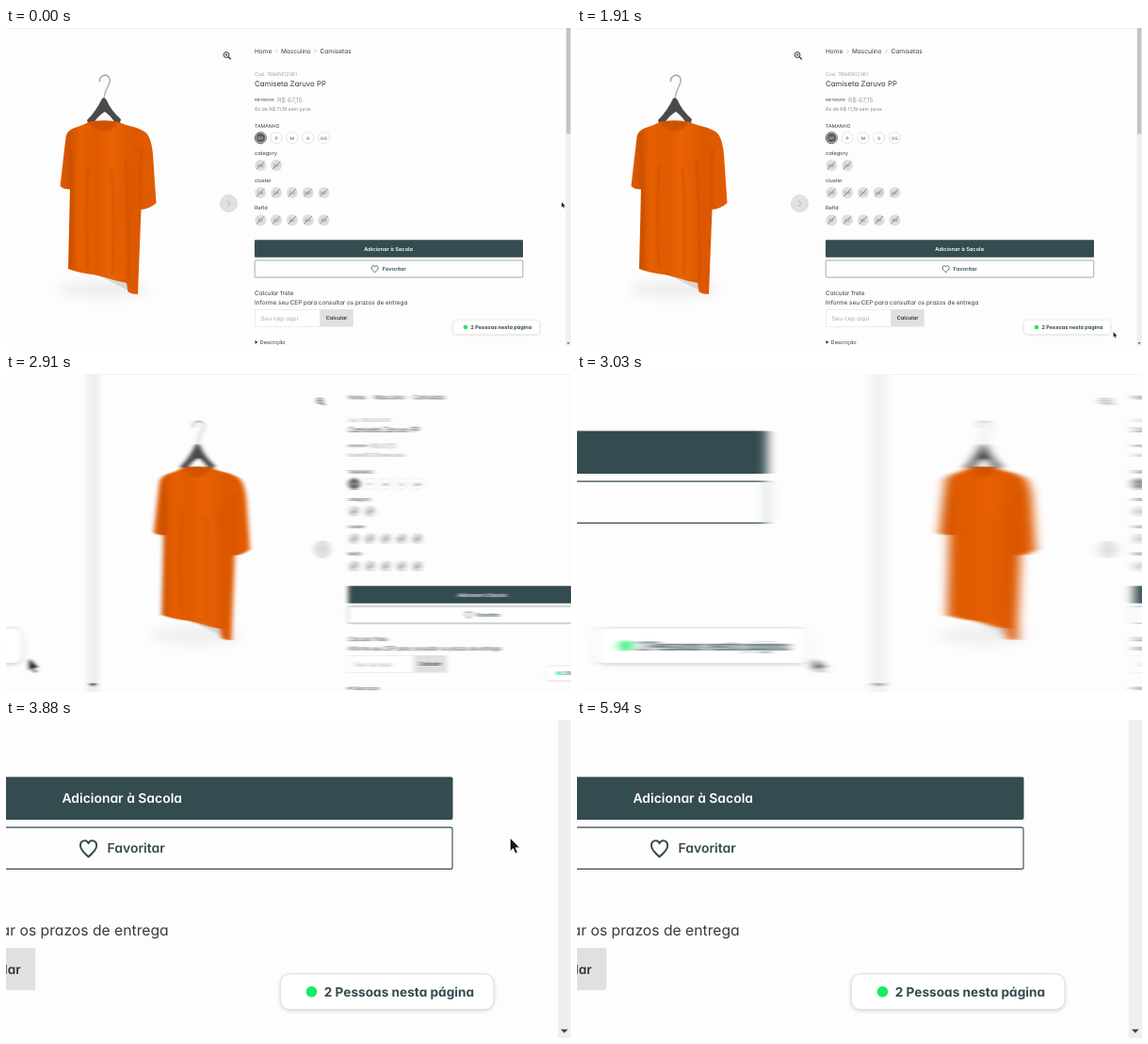
An HTML page for the animation above (6090 ms loop, 600 px wide and 338 px high).

```html
<!DOCTYPE html>
<html lang="pt">
<head>
<meta charset="utf-8">
<style>
html, body { margin: 0; width: 100%; height: 100%; overflow: hidden; background: #fefdfe; }
svg { display: block; width: 600px; height: 338px; }
filter { color-interpolation-filters: sRGB; }
text {
  font-family: Inter, "Open Sans", sans-serif;
  font-feature-settings: "cv11";
  text-rendering: geometricPrecision;
}
</style>
</head>
<body>
<svg viewBox="0 0 600 338">
  <defs>
    <linearGradient id="cloth">
      <stop offset="0" stop-color="#e05a00"/>
      <stop offset=".1" stop-color="#cf5300"/>
      <stop offset=".2" stop-color="#e65f00"/>
      <stop offset=".38" stop-color="#e05a00"/>
      <stop offset=".52" stop-color="#e96203"/>
      <stop offset=".76" stop-color="#dc5800"/>
      <stop offset="1" stop-color="#e25c00"/>
    </linearGradient>
    <filter id="soft" x="-30%" y="-80%" width="160%" height="260%"><feGaussianBlur stdDeviation="6"/></filter>
    <filter id="fold" x="-200%" y="-10%" width="500%" height="120%"><feGaussianBlur stdDeviation="1.3"/></filter>
    <filter id="lift" x="-10%" y="-40%" width="120%" height="190%"><feGaussianBlur stdDeviation=".8"/></filter>
    <filter id="motion" filterUnits="userSpaceOnUse" x="-60" y="-5" width="720" height="348">
      <feGaussianBlur id="smear" stdDeviation="0 0"/>
    </filter>
  </defs>
  <g id="stage">
    <g id="near">
      <g id="page">
        <rect width="600" height="338" fill="#fefdfe"/>
        <path d="M0 .5H594" stroke="#f3f3f3"/>

        <ellipse cx="103" cy="278" rx="48" ry="9" fill="#dddbdd" opacity=".45" filter="url(#soft)"/>
        <path d="M67 256L100 264L130 279L128 270Z" fill="#aaa" opacity=".4"/>
        <path d="M99.500 57C99 51 106 47.500 109.500 52.500C113 59 104 64 104 77" fill="none" stroke="#b5b5b5" stroke-width="1.500"/>
        <path d="M99.500 57C99 51 106 48 109 52.500" fill="none" stroke="#777" stroke-width=".5"/>
        <path d="M102 75Q105 73 107 77Q111 87 122 97L121 101H116Q110 92 105 89Q98 93 93 101H87L86 98Q96 88 102 75Z" fill="#4a4a4c"/>
        <path fill="url(#cloth)" d="M89 99.500Q104 97.500 118 99.500C126 103.500 138 104.500 147 110C153 114 155 124 156 134L159.500 186Q153 192 143.500 193L140 283Q134 283 129.500 280.500L128 271C112 268 100 262.500 88 261.500C80 260.500 72 258.500 66 256L68 171.500Q61 171.500 57.500 168L63.500 116Q64.500 110 70.500 107Q82 103 89 99.500Z"/>
        <path d="M89.500 99.500Q104 97.500 117.500 99.500C113 111 95 112 89.500 99.500Z" fill="#d05300"/>
        <path d="M89 99.500C94 113.500 114 112.500 118 99.500" fill="none" stroke="#c85000" stroke-width=".7"/>
        <g fill="none" stroke="#b94900" stroke-width="2" opacity=".5" filter="url(#fold)">
          <path d="M69 130Q71 190 69 252M87 145Q84 205 87 256M112 150Q116 210 113 262M127 140Q131 205 130 270M144 128Q142 160 143 191"/>
        </g>

        <g fill="none" stroke="#333" stroke-width="1">
          <circle cx="234" cy="28.500" r="2.900"/>
          <path d="M236.200 30.700L238.700 33.200" stroke-width="1.300"/>
          <path d="M232.500 28.500h3M234 27v3" stroke-width=".7"/>
        </g>
        <circle cx="236.500" cy="186.500" r="9" fill="#e1e1e1" stroke="#d0d0d0" stroke-width=".7"/>
        <path d="M235.300 183.600l2.700 2.900l-2.700 2.900" fill="none" stroke="#999" stroke-width=".8"/>
        <path d="M286.500 22.700l1.700 1.900l-1.700 1.900M327.500 22.700l1.700 1.900l-1.700 1.900" fill="none" stroke="#999" stroke-width=".5"/>

        <g id="chips"></g>
        <path d="M264 76H285" stroke="#777" stroke-width=".6"/>

        <rect x="264" y="225.200" width="285" height="18.500" rx=".8" fill="#344b4f"/>
        <rect x="264.200" y="247" width="284.600" height="18" rx=".8" fill="#fefefe" stroke="#344b4f" stroke-width=".45"/>
        <path d="M391.700 259.700C389.500 257.900 388.200 256.600 388.200 254.900C388.200 252.500 390.900 252 391.700 253.900C392.500 252 395.200 252.500 395.200 254.900C395.200 256.600 393.900 257.900 391.700 259.700Z" fill="none" stroke="#344b4f" stroke-width=".8" stroke-linejoin="round"/>

        <rect x="264.300" y="299.400" width="69.500" height="17.900" fill="#fefefe" stroke="#ddd" stroke-width=".5"/>
        <rect x="333.600" y="299.100" width="35.200" height="18.300" rx=".6" fill="#e0e0e0"/>
        <path d="M264.500 332l3 1.900l-3 1.900Z" fill="#333"/>

        <rect x="474.500" y="310.800" width="92.200" height="15.500" rx="4" fill="#bbb" opacity=".6" filter="url(#lift)"/>
        <rect x="474.500" y="310.300" width="92.200" height="15.400" rx="4" fill="#fff" stroke="#dcdcdc" stroke-width=".4"/>
        <circle id="glow" cx="488" cy="318" fill="#19f06a"/>
        <circle cx="488" cy="318" r="2.350" fill="#14ec66"/>
        <g id="labels"></g>

        <rect x="594.300" width="5.700" height="338" fill="#efeff0"/>
        <rect x="595" width="4.400" height="112.500" fill="#c3c3c4"/>
        <path d="M595.500 334.200h3.200l-1.600 1.700Z" fill="#444"/>
        <path id="cursor" d="M0 0V5.700L1.300 4.500L2.200 6.600L3.200 6.200L2.300 4.200H4.100Z" fill="#151515" stroke="#fff" stroke-width=".25"/>
      </g>
    </g>
    <g id="far"><use href="#page" transform="translate(600 338) scale(2.46) translate(-600 -338)"/></g>
  </g>
</svg>
<script>
const LOOP = 6090, ZOOM_SLIDE = { start: 2468, length: 1105 };
const $ = id => document.getElementById(id);

function add(parent, tag, attrs, content) {
  const node = document.createElementNS("http://www.w3.org/2000/svg", tag);
  for (const key in attrs) node.setAttribute(key, attrs[key]);
  if (content) node.textContent = content;
  return parent.appendChild(node);
}

function label(x, y, size, content, fill = "#3a3a3c", weight = 400, anchor = "start") {
  add($("labels"), "text", { x, y, "font-size": size, fill, "font-weight": weight, "text-anchor": anchor }, content);
}

const GRAY = "#858587", TEAL = "#344b4f";
label(264, 26.8, 6.5, "Home");
label(292, 26.8, 6.5, "Masculino");
label(333.5, 26.8, 6.6, "Camisetas");
label(264, 51.2, 5.2, "Cod. 78945612361", GRAY, 300);
label(264, 62.2, 7.85, "Camiseta Zaruvo PP");
label(264, 77.6, 4.3, "R$ 149,00", "#777");
label(288, 79, 7.1, "R$ 67,15", GRAY, 300);
label(264, 88, 5.25, "6x de R$ 11,19 sem juros", GRAY);
label(264, 105.8, 5.2, "TAMANHO");
label(264, 134.6, 5.6, "category");
label(264, 163.8, 5.5, "cluster");
label(264, 193, 5.6, "RefId");
label(406.2, 236.5, 5.66, "Adicionar à Sacola", "#fff", 600, "middle");
label(399.8, 258.1, 5.68, "Favoritar", TEAL, 600);
label(264, 284.4, 6.4, "Calcular frete");
label(264, 293.6, 6.38, "Informe seu CEP para consultar os prazos de entrega");
label(270.5, 310.8, 6.4, "Seu cep aqui", "#aaa");
label(339.7, 310.4, 5.55, "Calcular", "#333", 600);
label(269.6, 335.9, 5.65, "Descrição");
label(493.4, 320.1, 5.55, "2 Pessoas nesta página", TEAL, 700);

const chips = $("chips"), chipX = i => 270.3 + i * 16.8;

function chipText(x, y, content, fill) {
  add(chips, "text", { x, y: y + 1.7, "font-size": 4.6, fill, "text-anchor": "middle" }, content);
}

["PP", "P", "M", "G", "GG"].forEach((size, i) => {
  const cx = chipX(i), cy = 116.8, chosen = i === 0;
  add(chips, "circle", { cx, cy, r: 6, fill: "#fff", stroke: chosen ? "#555" : "#d2d2d2", "stroke-width": chosen ? 1 : 0.6 });
  if (chosen) add(chips, "circle", { cx, cy, r: 5, fill: "#5c5c5e" });
  chipText(cx, cy, size, chosen ? "#ddd" : "#444");
});

function unavailableRow(cy, names) {
  names.split(" ").forEach((name, i) => {
    const cx = chipX(i);
    add(chips, "circle", { cx, cy, r: 6, fill: "#dedede" });
    chipText(cx, cy, name, "#888");
    add(chips, "path", { d: `M${cx - 4.2} ${cy + 4.2}l8.4 -8.4`, stroke: "#c0605f", "stroke-width": 0.8 });
  });
}
unavailableRow(146, "MK DP");
unavailableRow(175, "DR DA DG MD MF");
unavailableRow(204.2, "BF AZ RE BA RB");

const clamp = v => Math.min(1, Math.max(0, v));
const progress = (t, start, end) => clamp((t - start) / (end - start));
const smooth = p => p * p * (3 - 2 * p);
const quint = p => p < 0.5 ? 16 * p ** 5 : 1 - 16 * (1 - p) ** 5;

function drawSlide(t) {
  const p = clamp((t - ZOOM_SLIDE.start) / ZOOM_SLIDE.length);
  const offset = 600 * quint(p);
  const speed = 600 * 80 * Math.min(p, 1 - p) ** 4 / ZOOM_SLIDE.length;
  $("near").setAttribute("transform", `translate(${offset} 0)`);
  $("far").setAttribute("transform", `translate(${offset - 600} 0)`);
  if (speed > 0.12) {
    $("smear").setAttribute("stdDeviation", `${speed * 2.3} ${Math.min(0.5, speed * 0.3)}`);
    $("stage").setAttribute("filter", "url(#motion)");
  } else {
    $("stage").removeAttribute("filter");
  }
}

function drawCursor(t) {
  const down = smooth(progress(t, 1150, 1930));
  const leave = smooth(progress(t, 3480, 4250));
  const x = 590 - 20.5 * down ** 1.3 + 8 * leave;
  const y = 185 + 138.3 * down - 135 * leave;
  $("cursor").setAttribute("transform", `translate(${x} ${y})`);
  $("cursor").setAttribute("visibility", leave < 1 ? "visible" : "hidden");
}

function drawGlow(t) {
  const p = clamp(((t + 820) % 1000) / 760);
  const spread = 1 - (1 - p) ** 2;
  $("glow").setAttribute("r", 2.35 + 2 * spread);
  $("glow").setAttribute("opacity", 0.6 * (1 - spread));
}

const origin = performance.now();
function frame() {
  const t = (performance.now() - origin) % LOOP;
  drawSlide(t);
  drawCursor(t);
  drawGlow(t);
  requestAnimationFrame(frame);
}
frame();
</script>
</body>
</html>
```
